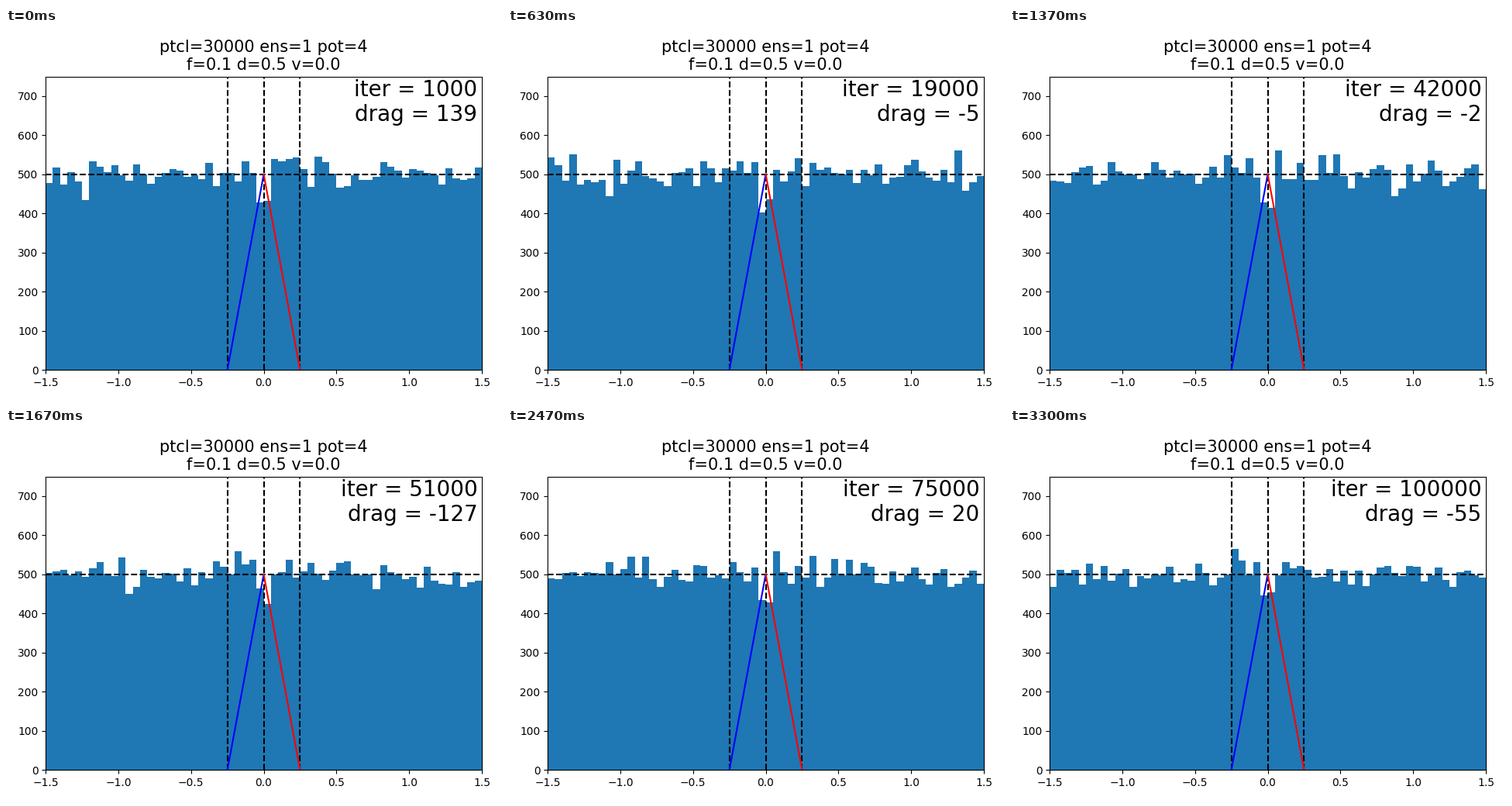
Recreate the animation shown at these times as a matplotlib script. Size 640x480 px, loop 3330 ms.

```python
import numpy as np
import matplotlib.pyplot as plt
from matplotlib.animation import FuncAnimation

FRAMES = 100
LOOP_MS = 3330
PARTICLES = 30000
BINS = 60
HALF = 0.25  # half width of the potential

edges = np.linspace(-1.5, 1.5, BINS + 1)
mids = (edges[:-1] + edges[1:]) / 2
left = (mids > -HALF) & (mids < 0)
right = (mids > 0) & (mids < HALF)

# Depleted at the peak, slightly crowded on its flanks
density = np.where(left | right, 1.035, 1.0)
density[abs(mids) < 0.05] = 0.875
density /= density.sum()


def counts_at(step):
    rng = np.random.default_rng(4000 + step)
    return rng.multinomial(PARTICLES, density)


fig, ax = plt.subplots(figsize=(6.4, 4.8), dpi=100)
hist = ax.stairs(counts_at(1), edges, fill=True, color="C0")
for x in (-HALF, 0, HALF):
    ax.axvline(x, color="k", ls="--")
ax.axhline(PARTICLES / BINS, color="k", ls="--")
ax.plot([-HALF, 0], [0, 500], color="b")
ax.plot([0, HALF], [500, 0], color="r")
ax.set_xlim(-1.5, 1.5)
ax.set_ylim(0, 750)
ax.set_title("ptcl=30000 ens=1 pot=4\nf=0.1 d=0.5 v=0.0", fontsize=15)
label = ax.text(0.99, 0.99, "", transform=ax.transAxes, fontsize=20,
                ha="right", va="top", linespacing=1.15)
fig.tight_layout()


def update(i):
    step = i + 1
    counts = counts_at(step)
    drag = counts[right].sum() - counts[left].sum()
    hist.set_data(counts)
    label.set_text(f"iter = {step * 1000}\ndrag = {drag}")
    return hist, label


anim = FuncAnimation(fig, update, frames=FRAMES, interval=LOOP_MS / FRAMES,
                     repeat=True, repeat_delay=0)
plt.show()
```
